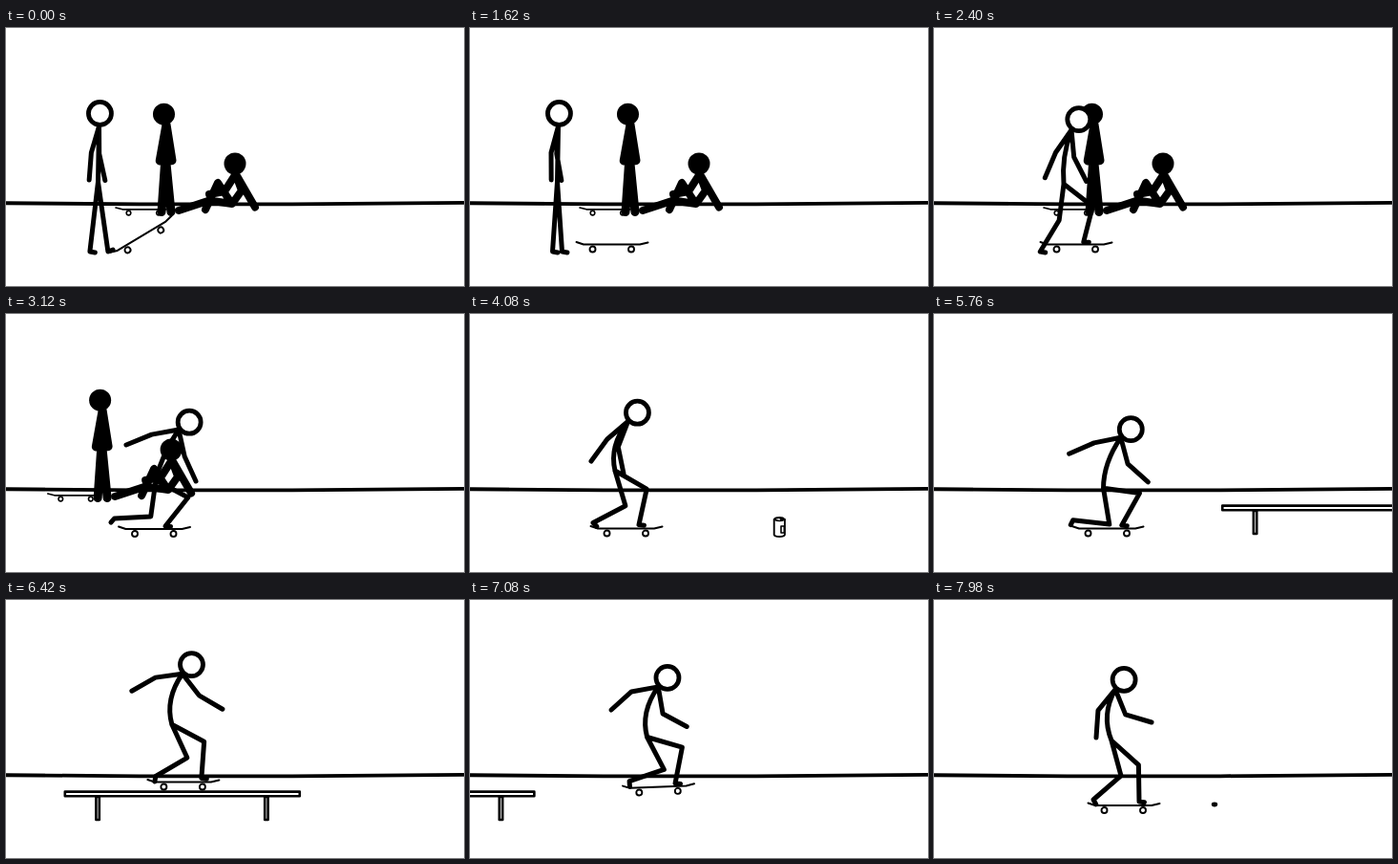
An HTML page for the animation above (8000 ms loop, 480 by 270 pixels).

```html
<!DOCTYPE html>
<html lang="en">
<head>
<meta charset="utf-8">
<title>Skater</title>
<style>
  html, body { margin: 0; width: 100%; height: 100%; overflow: hidden; background: #fff; }
  svg { display: block; width: 100vw; height: 100vh; }
  .line { fill: none; stroke: #000; stroke-linecap: round; stroke-linejoin: round; }
  .box { fill: #fff; stroke: #000; stroke-linejoin: round; }
</style>
</head>
<body>
<svg viewBox="0 0 480 270">
  <path class="line" stroke-width="3.8" d="M-5 183.2L140 184.3H300L485 182.9"/>

  <g id="spare">
    <path class="line" stroke-width="1.7" d="M115 188L122 189.8H168"/>
    <circle class="box" stroke-width="1.6" cx="128.5" cy="193.6" r="2.3"/>
    <circle class="box" stroke-width="1.6" cx="160" cy="193.6" r="2.3"/>
  </g>
  <g id="friends">
    <circle cx="165.5" cy="90.2" r="11.5"/>
    <path stroke="#000" stroke-width="9" stroke-linejoin="round" d="M168 101L161.2 139 174 138.7Z"/>
    <path class="line" stroke-width="9" d="M166.5 142L163 192.5M168 142L173 192.5"/>
    <circle cx="240" cy="142" r="11.5"/>
    <path class="line" stroke-width="8" d="M241 153L261 187.5M241 154L247 170 237 184 213 180.5 181 191M240 154L229 171 213 174M234 180L222 162 209 190"/>
  </g>

  <g id="can">
    <path class="box" stroke-width="1.9" d="M-5.6 -8V8Q-5 10 0 10T5.6 8V-8Q4 -10 0 -10T-5.6 -8Z"/>
    <path class="line" stroke-width="1.6" d="M-5.6 -8Q0 -5 5.6 -8M1 -8.4H4"/>
    <path class="box" stroke-width="1.6" d="M1.7 -1H5V6H1.7Z"/>
  </g>
  <g id="bench" class="box" stroke-width="2.6">
    <rect x=".8" y="200.6" width="246" height="4.6"/>
    <rect x="33.4" y="206" width="3.4" height="24"/>
    <rect x="210.2" y="206" width="3.4" height="24"/>
  </g>
  <ellipse id="stone" rx="3.2" ry="2.4"/>

  <g id="board">
    <circle class="box wheel" stroke-width="1.9" cx="-20.5" r="3"/>
    <circle class="box wheel" stroke-width="1.9" cx="20" r="3"/>
    <path id="deck" class="line" stroke-width="2"/>
  </g>
  <circle id="head" class="box" stroke-width="4.8" r="12"/>
  <path id="limbs" class="line" stroke-width="5"/>
</svg>

<script>
const LOOP = 8000, STEP = 60, ARM = 28.5;
const $ = id => document.getElementById(id);
const rad = deg => deg * Math.PI / 180;
const pt = (x, y) => x.toFixed(2) + ' ' + y.toFixed(2);
const ramp = (t, a, b) => Math.min(1, Math.max(0, (t - a) / (b - a)));
const smooth = k => k * k * (3 - 2 * k);

// Linear or eased keys of the form [time, ...values]
function track(keys, t, ease = k => k) {
  const n = keys.findIndex(k => k[0] > t);
  if (n <= 0) return keys.at(n).slice(1);
  const [a, b] = [keys[n - 1], keys[n]];
  const k = ease(ramp(t, a[0], b[0]));
  return a.slice(1).map((v, i) => v + (b[i + 1] - v) * k);
}

// Poses are relative to the board centre; a foot is x, y, toe angle
const pose = (neck, hip, hands, feet, head = -45, bend = -13) =>
  [...neck, ...hip, ...hands, ...feet, head, bend];
const onBoard = (dx, toe) => [dx - 34, -6, toe, dx + 14, -4, 8];

function stand(x, stride, lift = 0, toe = 10, head = -86) {
  const foot = x - 2 - .4 * stride;
  return pose([x, -123.5], [x - 1, -65.5], [x - 4 - stride / 3, -67.5, x + stride / 3, -67],
    [foot, 7.5, 10, foot + stride, 7.5 - lift, toe], head, 0);
}

const ride = pose([1.5, -112], [-12, -60.5], [-37, -70.5, -3, -57.5], onBoard(-1, 45), -43);
const cruise = pose([-9, -121.5], [-13, -68], [-29, -71, 29, -87], onBoard(2, 60), -48);
const glide = pose([-1, -113.5], [-12, -60.5], [-54, -95.5, 41, -76.5], onBoard(5, 100));
const flip = pose([-18, -132.5], [-18, -77.5], [-69, -107.5, 41, -136.5],
  [-49, -10.5, 80, 36, -27.5, 18], -45, -8);
const push = pose([25.5, -104], [1.5, -51], [-29.5, -88, 43.5, -50],
  [-42, -11, 130, 11.5, -3, 5], -35, -6);
const kick = pose([12, -116], [-3, -61], [-24, -72, 28, -65], [-33, 7.5, 10, 12, -3, 5]);

const ACTS = [
  [0, stand(-51.5, 19, 0, -20)], [1020, stand(-51.5, 19, 0, -20)], [1260, stand(-57.5, 15, 5, -20)],
  [1620, stand(-56.5, 10)], [1800, stand(-42, 28, 6)], [2160, stand(-22, 46, 10, 5, -65)],
  [2640, kick], [3120, push], [3480, cruise], [4080, ride], [4440, ride],
  [4740, flip], [4920, flip], [5160, glide], [5460, kick], [5640, push],
  [5900, glide], [6900, glide], [7440, ride], [7860, cruise]
].map(([t, p]) => [t, ...p]);

// Board position on whatever it rolls on; hops are added on top
const ROLL = [
  [2640, 149, 226.5], [3120, 155.5, 225], [4080, 164, 224.5], [4920, 177, 224.5],
  [5760, 182, 224.5], [6030, 184.5, 190.5], [6600, 186.5, 190.5], [7140, 199, 215]
];
const HOPS = [[4440, 5220, 39], [5760, 6030, 22], [6600, 7140, 42]];

// Distance covered after reaching full speed over the given time, in steps
function run(t, start, accel) {
  const s = Math.max(0, t - start);
  return (s < accel ? s * s / (2 * accel) : s - accel / 2) / STEP;
}
// Each push makes the world pass faster
const world = t => 15.14 * run(t, 2700, 310) + 6.72 * run(t, 5300, 300) + 2.7 * run(t, 7200, 200);

function place(id, x, y, seenAt, t) {
  const left = x + world(seenAt) - world(t);
  $(id).setAttribute('transform', `translate(${pt(left, y)})`);
}

// Two equal bones; the sign of side picks the bend direction
function limb([ax, ay], [bx, by], len, side, least) {
  const dx = bx - ax, dy = by - ay, d = Math.hypot(dx, dy) || 1;
  const h = side * Math.max(least, Math.sqrt(Math.max(0, len * len - d * d / 4))) / d;
  return `M${pt(ax, ay)}L${pt((ax + bx) / 2 + dy * h, (ay + by) / 2 - dx * h)}L${pt(bx, by)}`;
}

function drawBoard(x, y, tilt, spin) {
  const s = Math.abs(Math.sin(rad(spin)));
  $('board').setAttribute('transform', `translate(${pt(x, y)}) rotate(${tilt.toFixed(2)})`);
  const flat = s < .05, h = 4.2 * s;
  $('deck').setAttribute('d', flat ? 'M-37.5 -2.5L-30 0H29L37.5 -2'
    : `M-37 ${-h / 3}L-28 ${-h}H29L37 ${-h / 3}V${h}H-38Z`);
  $('deck').style.fill = flat ? 'none' : '#333';
  for (const w of document.querySelectorAll('.wheel')) w.setAttribute('cy', 5 * Math.cos(rad(spin)));
}

function drawRider(t, ox, oy) {
  const p = track(ACTS, t, smooth);
  // Knees give around every take-off and landing
  const dip = HOPS.flatMap(h => h.slice(0, 2))
    .reduce((sum, e) => sum + 13 * Math.exp(-(((t - e) / 90) ** 2)), 0);
  const at = i => [p[i] + ox, p[i + 1] + oy + (i < 8 ? dip : 0)];
  const neck = at(0), hip = at(2), [head, bend] = p.slice(-2);
  const leg = 36.5 + 1.8 * ramp(t, 1700, 2100);

  let d = `M${pt(...neck)}Q${pt((neck[0] + hip[0]) / 2 + bend, (neck[1] + hip[1]) / 2)} ${pt(...hip)}`;
  for (const i of [4, 6]) d += limb(neck, at(i), ARM, -1, 3);
  for (const i of [8, 11]) {
    const foot = at(i), a = rad(p[i + 2]);
    d += limb(hip, foot, leg, 1, 0);
    d += 'L' + pt(foot[0] + 5.5 * Math.cos(a), foot[1] + 5.5 * Math.sin(a));
  }
  $('limbs').setAttribute('d', d);

  const glance = 16 * ramp(t, 0, 240) - 26 * ramp(t, 360, 660) + 10 * ramp(t, 1020, 1620);
  const a = rad(head + glance);
  $('head').setAttribute('cx', neck[0] + 13.6 * Math.cos(a));
  $('head').setAttribute('cy', neck[1] + 13.6 * Math.sin(a));
}

function render(ms) {
  let t = Math.floor(ms / STEP) * STEP;
  if (t > 7440) t = Math.max(7440, t - 120);  // a short freeze before the stone

  let [x, y] = track(ROLL, t), tilt = 0;
  for (const [from, to, height] of HOPS) {
    const k = ramp(t, from, to);
    y -= height * 4 * k * (1 - k);
    tilt -= 20 * (1 - k) * Math.min(1, k * 8);
  }
  const prop = 1 - ramp(t, 1080, 1380);  // board leaning up under the foot
  drawBoard(x - 6.5 * prop, y - 9 * prop, tilt - 31 * prop, 360 * ramp(t, 4560, 5040));
  drawRider(t, x, y);

  place('friends', 0, 0, 0, t);
  place('spare', -1.065 * world(t) + world(t), 0, 0, t);
  place('can', 324.3, 223, 4080, t);
  place('bench', 61, 0, 6420, t);
  place('stone', 294, 214, 7860, t);
}

function tick() {
  render(performance.now() % LOOP);
  requestAnimationFrame(tick);
}
tick();
</script>
</body>
</html>
```
